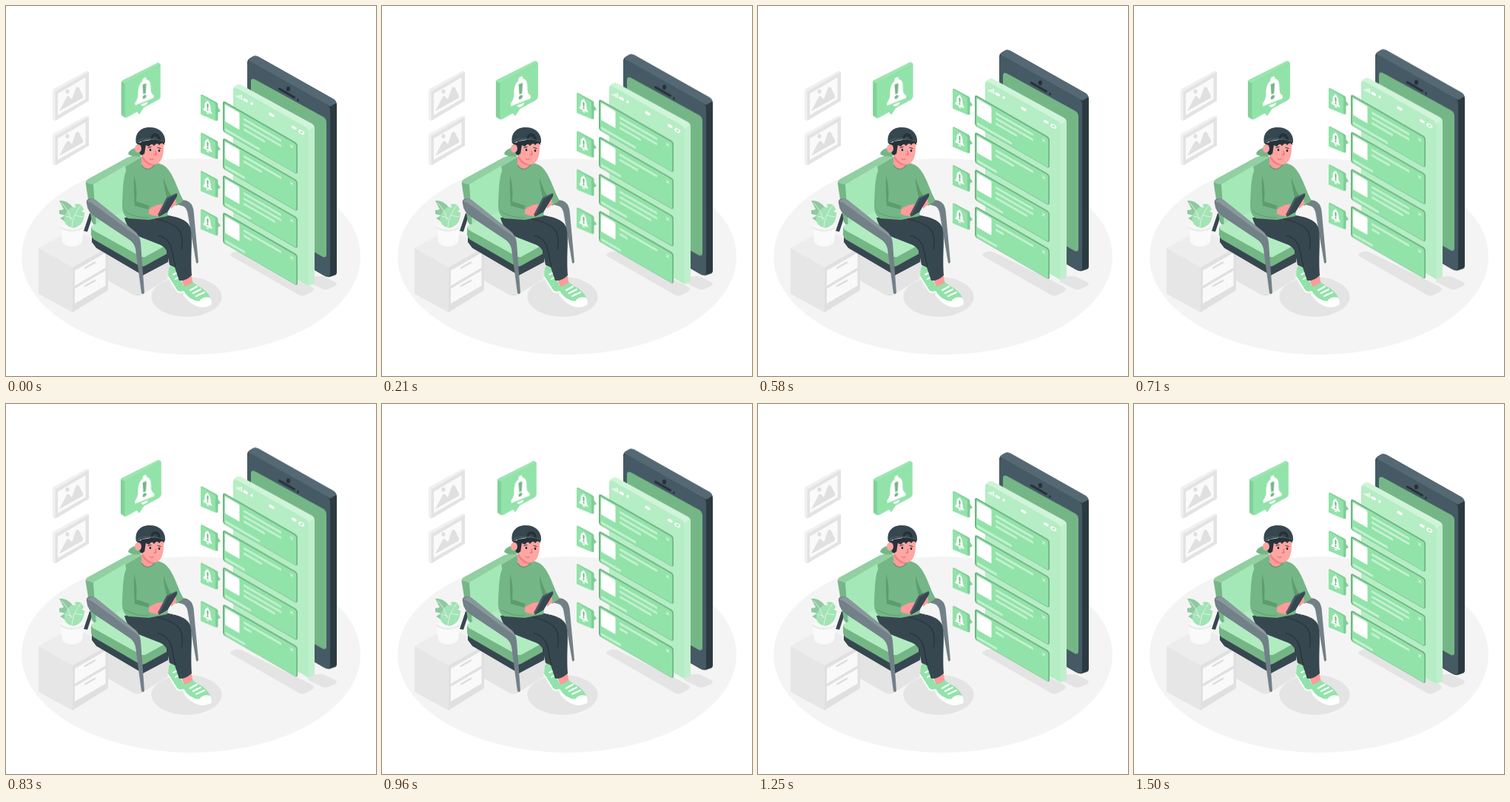
An HTML page for the animation above (1540 ms loop, 500x500 px).

```html
<!DOCTYPE html>
<html lang="en">
<head>
<meta charset="utf-8">
<title>Notifications</title>
<style>
html, body { margin: 0; width: 100%; height: 100%; overflow: hidden; background: #fff; }
svg { display: block; width: 100vw; height: 100vh; }
#bubble { transform-origin: 182px 113px; }
</style>
</head>
<body>
<svg viewBox="0 0 500 500" xmlns="http://www.w3.org/2000/svg">
<defs>
  <g id="bell">
    <path fill="#fff" d="M-2.500-16C-4-21 4-21 2.500-16C8-14 8.500-7 8.500-1C8.500 4 10 6 12.500 9V12.500H-12.500V9C-10 6-8.500 4-8.500-1C-8.500-7-8-14-2.500-16ZM-4.500 14.500H4.500C4 19-4 19-4.500 14.500Z"/>
    <path fill="#75b687" d="M-2.500-11H2.500L1.700 2H-1.700Z"/>
    <circle cy="6" r="2.500" fill="#75b687"/>
  </g>
  <g id="frame">
    <path fill="#f0f0f0" d="M63 114Q63 113 64 112L109 87.500 112 89V128L66.500 155 63 153Z"/>
    <path fill="#e3e3e3" d="M66.500 115.500 112 89V128L66.500 155Z"/>
    <path fill="#fafafa" d="M70 118.500 107.500 96.500V126L70 147.500Z"/>
    <path fill="#e0e0e0" d="M72 142 82 123Q84 120 86 123L89 126 94 112Q96 107 99 111L104 121V124Z"/>
    <ellipse cx="83" cy="115.500" rx="2.600" ry="3" fill="#e0e0e0"/>
  </g>
  <g id="icon">
    <path fill="#80cd97" d="M263 121.500Q263 119 265.500 120L285 130.500Q286.500 131.500 286.500 133V137L290 142 286.500 144V153.500Q286.500 156 284 155L264.500 147Q263 146.500 263 145Z"/>
    <path fill="#92e3a9" d="M263 121.500Q263 120 265 121L281.500 131Q283 132 283 133.500V155L264.500 147Q263 146.500 263 145Z"/>
    <use href="#bell" transform="matrix(.47 .22 0 .47 272.500 137.500)"/>
  </g>
</defs>

<ellipse cx="250" cy="338.500" rx="229" ry="132.500" fill="#f4f4f4"/>
<g fill="#e4e4e4">
  <ellipse cx="244" cy="393" rx="47.500" ry="27"/>
  <path d="M304 335Q309 330 317 332L413 379Q419 383 412 387L404 391Q400 393 395 390L306 339Q302 337 304 335ZM409 366 428 365 445 373Q449 376 444 379L434 383Q430 384 427 382L408 373ZM133 336 219 340 226 364 182 391Q177 393 171 390L133 368Z"/>
</g>
<use href="#frame"/>
<use href="#frame" y="60.500"/>

<!-- bedside cabinet -->
<path fill="#e6e6e6" d="M44 327 90 353V414L44 389Z"/>
<path fill="#e0e0e0" d="M90 353 138 326V384L90 414Z"/>
<path fill="#ededed" d="M44 327 91 301 138 326 90 353Z"/>
<path fill="#f9f9f9" d="M93 357.500 134.500 333.500V353.500L93 378ZM93 382 134.500 357.500V378L93 402Z"/>
<path fill="none" stroke="#dcdcdc" stroke-width="2.500" stroke-linecap="round" d="M107 354 120 346.500M107 378.500 120 371"/>

<!-- plant -->
<path fill="#fafafa" d="M73 296 76 318C79 327 100 327 103 318L105.500 296Z"/>
<path fill="#ededed" d="M73 297Q89 307 105.500 297L105 301Q89 309 73.500 301Z"/>
<path fill="#8fcaa1" d="M72 263C81 262 91 268 93 280L89 298 82 294 78 290 73 287 80 283 72 281 72 276 78 275Z"/>
<path fill="#a3e3b5" d="M79 291C77 283 84 274 90 271L94 273 93 268C100 265 104 271 105 275L102 278 106 279C106 289 102 298 91 300Q82 299 79 291Z"/>
<path fill="none" stroke="#e2f6e8" stroke-width=".9" d="M75 266Q86 277 88 290M101 270Q90 283 89 299M90 287 81 284M93 283 104 285"/>

<!-- chair -->
<path fill="#37474f" d="M113 280 118 281 110 305 105 304ZM116 306 186 346 219 329V346L185 364 122 327 116 319Z"/>
<path fill="#75b687" d="M108 242C107 237 109 235 113 233L164 205Q173 201 185 204L192 265 125 303 116 292Z"/>
<path fill="#92cfa3" d="M109 239Q108 236 113 233L164 205Q173 201 184 204L120 242Z"/>
<path fill="#a5e8b8" d="M118 241 161 216 175 285 122 299Z"/>
<path fill="#75b687" d="M115 299 187 337 217 320V335L188 351Q184 353 180 351L118 315Q115 312 115 309Z"/>
<path fill="#b1ecc1" d="M116 297 160 277 217 313V323L188 339Q185 340 181 338L118 303Q114 300 116 297Z"/>
<path fill="#728087" d="M214 257 244 263Q252 266 253.500 276L260 346Q259 349 257 347L246 283Q245 272 238 270L214 264Z"/>

<!-- reader -->
<g>
  <path fill="#92e3a9" d="M220 354Q224 348 231 349L235 368 241 380 240 387Q235 390 230 384L219 368Z"/>
  <path fill="none" stroke="#fff" stroke-width="2" stroke-linecap="round" d="M219 366 231 385Q236 389 241 385M226 363 232 360M229 369 234 366"/>
  <path fill="#ff9b9b" d="M236 366 250 362 253 376 241 380Z"/>
  <path fill="#92e3a9" d="M239 379Q246 379 252 373 257 377 266 382 276 390 278 399 270 407 257 404 246 398 239 388Z"/>
  <path fill="#fff" d="M261 399Q266 392 276 394 279 399 277 404 268 410 256 405 242 398 238 386L240 385Q248 398 261 399Z"/>
  <path fill="none" stroke="#fff" stroke-width="2.200" stroke-linecap="round" d="M249 384 258 379M253 388 263 383M257 392 268 387"/>
  <path fill="#37474f" d="M160 286 215 282C230 285 245 288 249 299 253 315 249 331 251 364Q243 372 234 371L228 353 221 350 217 331Q214 324 204 321L181 312Q165 305 160 286Z"/>
  <path fill="none" stroke="#263238" stroke-width="1.200" d="M203 288Q230 294 236 306 240 318 237 329M205 310Q220 313 224 329L229 353"/>
  <path fill="#75b687" d="M183 212Q171 213 165 219C158 226 158 248 157 270Q157 283 165 287L193 289 218 284 221 263 230 270 240 263C233 252 229 234 220 222Q214 213 200 211Z"/>
  <path fill="#5e9c70" d="M173 229Q178 247 176 264L194 270 192 275 174 270Q172 250 173 229ZM213 231Q217 247 224 258L219 263Q213 249 213 231Z"/>
  <path fill="none" stroke="#5e9c70" stroke-width="1" d="M161 278Q177 287 193 286"/>
  <path fill="#ff9b9b" d="M183 202 200 204V217Q191 226 183 216Z"/>
  <path fill="none" stroke="#5e9c70" stroke-width="1.500" d="M183 215Q191 226 201 215"/>
  <path fill="#75b687" d="M179 191Q167 193 165 199 166 204 181 203L187 199Z"/>
  <path fill="#263238" d="M177 185 214 180V187L190 205 181 200Z"/>
  <path fill="#ffa6a3" d="M188 188 213 185C214 198 211 214 201 214Q190 213 184 202L187 199Z"/>
  <path fill="#f28080" d="M185 203Q190 212 199 214V216Q189 215 184 206Z"/>
  <path fill="#263238" d="M183 183 214 178V187L210 185 207 188 204 185 200 189 197 186 193 190 189 188 187 200 183 198Z"/>
  <ellipse cx="178.500" cy="192.500" rx="4.500" ry="5.500" fill="#ffa6a3"/>
  <path fill="#37474f" d="M176 186C173 170 184 163 196 164 211 165 216 176 215 185Q211 182 206 181 190 179 176 186Z"/>
  <path fill="#263238" d="M195 180Q196 172 202 172 209 173 209 181L206 182Q206 177 202 176 198 176 198 181Z"/>
  <path fill="none" stroke="#546a74" stroke-width=".8" d="M177 183Q190 175 214 183"/>
  <ellipse cx="195" cy="194.500" rx="1.300" ry="1.700" fill="#263238"/>
  <ellipse cx="207" cy="195.500" rx="1.300" ry="1.700" fill="#263238"/>
  <path fill="none" stroke="#263238" stroke-width="1" stroke-linecap="round" d="M192 191.500 196 190.500M205 191.500 209 192.500"/>
  <path fill="none" stroke="#e35f5f" stroke-width="1" stroke-linecap="round" d="M202 196 203 201 200 201M194 206Q196 209 199 207"/>
  <path fill="#ff9b9b" d="M193 275Q200 269 209 268L216 267 213 277 209 284Q201 285 193 281ZM222 264 229 261 231 267 223 274Z"/>
  <path fill="#455a64" d="M205 282 217 259 230 253Q232 253 231 257L219 277Q218 279 215 280L207 285Z"/>
  <path fill="#37474f" d="M207 284 219 261 231 254 231 257 219 277Q218 279 215 280Z"/>
</g>

<path fill="#728087" d="M109 267C107 260 115 258 121 262L172 303Q181 309 182 320L187 387Q186 391 183 388L175 328Q173 320 167 316L122 286Q110 279 109 267Z"/>
<path fill="#8a979d" d="M110 264Q114 258 121 262L172 303Q178 307 180 314 176 310 170 306L121 270Q114 265 110 264Z"/>

<!-- large bubble -->
<g id="bubble">
  <path fill="#80d298" d="M156 104Q156 101 159 100L204 77.500Q206 76.500 208.500 79V122Q208.500 124 206 126L186 137 180 146 177 142 163 150Q161 151 159 149L156 147Z"/>
  <path fill="#9ae6af" d="M156 102 204 77.500Q206 76.500 208.500 79L161 105Z"/>
  <path fill="#92e3a9" d="M161 107Q161 105 163 104L206 80.500Q208.500 79.500 208.500 82V122Q208.500 124 206 126L186 137 180 146 178 142 164 150Q161 151 161 148Z"/>
  <use href="#bell" transform="matrix(1 -.4 0 1 187 116.500)"/>
</g>

<!-- phone with its floating layers -->
<g id="phone">
  <path fill="#2c3a41" d="M326 77Q326 73 329 71L334 68Q337 67 341 68.500L443 126Q447 129 447 134V360Q447 363 444 364L438 366Q434 367 429 364L330 306Q326 304 326 300Z"/>
  <path fill="#546974" d="M327 74Q329 71 334 68 337 67 341 68.500L443 126Q446 128 446.500 131L438 136 333 77Z"/>
  <path fill="#455a64" d="M326 78Q327 73 332 76L433 133Q438 136 438 141V362Q438 367 432 365L330 306Q326 304 326 300Z"/>
  <path fill="#75b687" d="M331 102Q331 97 336 99L429 150Q433 153 433 157V336Q433 341 428 339L331 284Z"/>
  <path fill="none" stroke="#263238" stroke-width="3" stroke-linecap="round" d="M369.500 112 389.500 123.500"/>
  <ellipse cx="381.500" cy="112" rx="2.600" ry="3.200" fill="#263238"/>
  <ellipse cx="394.500" cy="127" rx="1.300" ry="1.700" fill="#263238"/>

  <path fill="#c0efcd" d="M307 114Q307 110 310 108L313 106.500Q315 105.500 318 107L413 159Q417 161 417 165V372Q417 375 414 376L409 378 307 319Z"/>
  <path fill="#d0f4da" d="M307.500 111 313 106.500Q315 105.500 318 107L413 159Q416 161 416.500 163L409 168Z"/>
  <path fill="#b5edc4" d="M307 114Q307 109 312 111L404 163Q408.500 166 408.500 170V378L307 319Z"/>
  <g fill="none" stroke="#fff" stroke-linecap="round">
    <path stroke-width="1.300" d="M311.500 121.500V122.500M313.800 121.500V123.700M316 121V125M318.300 120.500V126.200"/>
    <path stroke-width="3.500" d="M322 126.500 325.500 128.500M332 131.500V132M357 146 361 148.500M387.500 163.500 391 165.500"/>
    <path stroke-width="4.800" d="M397.500 169.500 401 171.500"/>
    <path stroke="#92e3a9" stroke-width="2" d="M398.500 170 400 171"/>
  </g>
  <g id="cards"></g>
</g>
</svg>
<script>
const LOOP = 1540;
const cards = [
  { text: [51, 51, 29], foot: 47 },
  { text: [51, 25], foot: 27 },
  { text: [51, 51, 43], foot: 35 },
  { text: [51, 11], foot: 27 }
];
const bar = (x, y, w) => `<rect x="${x}" y="${y}" width="${w}" height="3.200" rx="1" fill="#c6f2d2"/>`;

function card({ text, foot }, i) {
  const lines = text.map((w, row) => bar(28, 7.5 + row * 7, w)).join("");
  return `<use href="#icon" y="${i * 51.7}"/>
    <g transform="matrix(1 .577 0 1 293 ${127.5 + i * 50.2})">
      <rect width="101" height="42" rx="3.500" fill="#6fb181"/>
      <rect x="1.800" y="2" width="97.600" height="39.500" rx="2.500" fill="#92e3a9"/>
      <rect x="3" y="4" width="19.500" height="23" rx="1.500" fill="#fff"/>
      ${lines}${bar(3, 36, foot)}
      <path d="M91 6.500 95 10.500M95 6.500 91 10.500" stroke="#d7f6df" fill="none"/>
    </g>`;
}
document.getElementById("cards").innerHTML = cards.map(card).join("");

function play(id, steps, easing, delay = 0) {
  const frames = steps.map(([ms, transform]) => ({ offset: ms / LOOP, transform, easing }));
  const run = document.getElementById(id).animate(frames, { duration: LOOP, iterations: Infinity, delay });
  run.startTime = 0;
}
const lift = y => `translateY(${y}px)`;
const grow = s => `scale(${s})`;

play("phone", [[0, lift(0)], [770, lift(-8.8)], [LOOP, lift(0)]], "cubic-bezier(.37,0,.63,1)", -50);
play("bubble", [
  [0, grow(1.01)], [225, grow(1.08)], [490, grow(1)],
  [700, grow(1.08)], [960, grow(1)], [1500, grow(1)], [LOOP, grow(1.01)]
], "ease-in-out");
</script>
</body>
</html>
```
